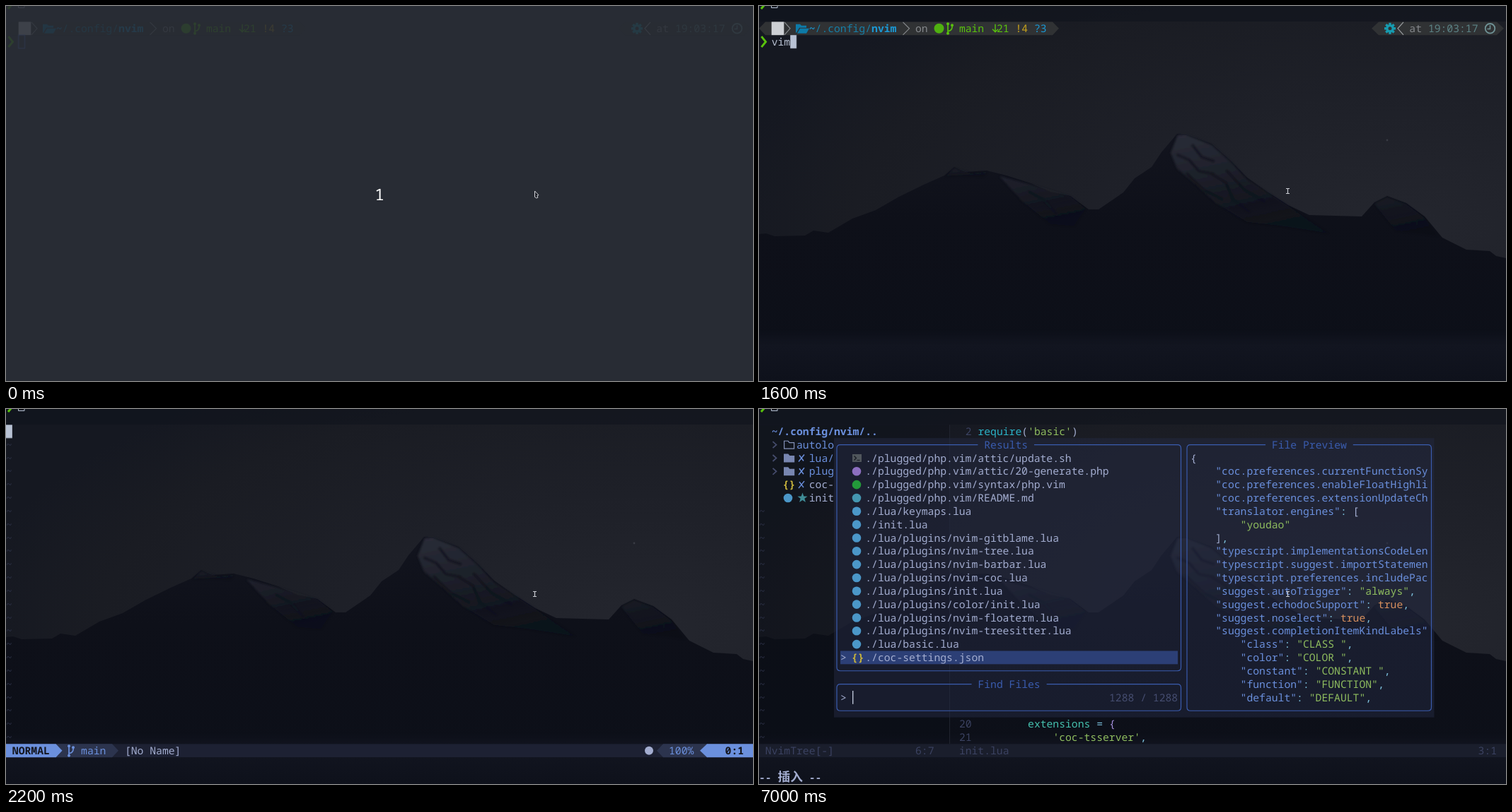
An HTML page for the animation above (8000 ms loop, 1056 px wide and 531 px high).

```html
<!DOCTYPE html>
<html lang="en">
<head>
<meta charset="utf-8">
<title>Editor session</title>
<style>
html, body { margin: 0; width: 100%; height: 100%; overflow: hidden; background: #282c34; }
svg { display: block; width: 1056px; height: 531px; }
text {
  font: 300 14.733px "Noto Sans Mono", "DejaVu Sans Mono", monospace;
  white-space: pre; text-rendering: geometricPrecision; font-variant-ligatures: none;
}
.b { font-weight: 700; }
.cjk { font: 700 17.68px "Noto Sans CJK SC", "Noto Sans CJK", sans-serif; }
.count { font-size: 22.5px; font-weight: 400; text-anchor: middle; }
#stage > g, #typed text, #cursor { animation: 8s step-end infinite; }

#stage > #photo { animation-name: photo; }
#stage > #top { animation-name: top; }
#stage > #count { animation-name: count; }
#stage > #prompt { animation-name: prompt; }
#stage > #typed { animation-name: typed; }
#stage > #empty { animation-name: empty; }
#stage > #code { animation-name: code; }
#stage > #finder { animation-name: finder; }
#stage > #beam { animation-name: beam; }
#stage > #arrow { animation-name: arrow; }
#cursor { animation-name: cursor; }
#typed .v { animation-name: v; }
#typed .i { animation-name: i; }
#typed .m { animation-name: m; }

@keyframes photo { 0% { opacity: 0 } 6.25%, to { opacity: 1 } }
@keyframes top { 0% { opacity: .13 } 6.25%, to { opacity: 1 } }
@keyframes count { 0% { opacity: 1 } 6.25%, to { opacity: 0 } }
@keyframes prompt { 0% { opacity: .13 } 6.25% { opacity: 1 } 26.25%, to { opacity: 0 } }
@keyframes typed { 0% { opacity: 1 } 26.25%, to { opacity: 0 } }
@keyframes empty { 0% { opacity: 0 } 27.5% { opacity: 1 } 61.25%, to { opacity: 0 } }
@keyframes code { 0% { opacity: 0 } 61.25% { opacity: 1 } 87.5%, to { opacity: 0 } }
@keyframes finder { 0% { opacity: 0 } 87.5%, to { opacity: 1 } }
@keyframes beam { 0% { opacity: 0 } 6.25% { opacity: 1 } 28.75% { opacity: 0 } 87.5%, to { opacity: 1 } }
@keyframes arrow {
  0% { opacity: 1; transform: translate(-1px, 0) }
  6.25% { opacity: 0 }
  28.75% { opacity: 1; transform: none }
  87.5%, to { opacity: 0 }
}
@keyframes cursor {
  0% { transform: translate(17.68px, 41.2px); fill: #282c34; stroke: #30394f }
  6.25% { transform: translate(17.68px, 41.2px); fill: #b8c2d4; stroke: none }
  11.25% { transform: translate(26.52px, 41.2px); fill: #b8c2d4; stroke: none }
  17.5% { transform: translate(35.36px, 41.2px); fill: #b8c2d4; stroke: none }
  20% { transform: translate(44.2px, 41.2px); fill: #b8c2d4; stroke: none }
  26.25% { transform: translate(0, 22.4px); fill: #b8c2d4; stroke: none }
  28.75% { transform: translate(35.36px, 22.4px); fill: #b8c2d4; stroke: none }
  61.25%, to { transform: translate(35.36px, 22.4px); fill: transparent; stroke: none }
}
@keyframes v { 0% { fill: transparent } 11.25%, to { fill: #b6bfd0 } }
@keyframes i { 0% { fill: transparent } 11.25% { fill: #191c26 } 17.5%, to { fill: #b6bfd0 } }
@keyframes m { 0% { fill: transparent } 11.25% { fill: #565d6c } 17.5% { fill: #191c26 } 20%, to { fill: #b6bfd0 } }
</style>
</head>
<body>
<svg id="stage" viewBox="0 0 1056 531" xmlns="http://www.w3.org/2000/svg">
  <defs>
    <radialGradient id="sky" gradientUnits="userSpaceOnUse" cx="0" cy="0" r="1" gradientTransform="translate(900 310) scale(960 420)">
      <stop offset="0" stop-color="#24262e"/><stop offset=".45" stop-color="#1e2028"/>
      <stop offset=".8" stop-color="#1a1c23"/><stop offset="1" stop-color="#151821"/>
    </radialGradient>
    <linearGradient id="rock" x2="0" y2="1">
      <stop offset="0" stop-color="#12141e"/><stop offset=".35" stop-color="#0e1019"/><stop offset="1" stop-color="#0c0f18"/>
    </linearGradient>
    <linearGradient id="mist" x2="0" y2="1">
      <stop offset="0" stop-color="#121520" stop-opacity="0"/><stop offset=".3" stop-color="#121520"/><stop offset="1" stop-color="#0e111b"/>
    </linearGradient>
    <linearGradient id="snow" x2=".35" y2="1">
      <stop offset="0" stop-color="#2a2d38"/><stop offset=".5" stop-color="#1b1e28"/><stop offset="1" stop-color="#11131c" stop-opacity=".3"/>
    </linearGradient>
    <filter id="soft"><feGaussianBlur stdDeviation="1.6"/></filter>
  </defs>

  <g id="photo">
    <path fill="url(#sky)" d="M0 0H1056V531H0z"/>
    <path fill="#10131d" opacity=".55" d="M0 0H1056V22H0z"/>
    <path fill="url(#rock)" d="M0 323L10 322 22 326 65 325 77 318 98 321 132 301 165 289 198 270 235 252 262 240 276 228 292 235 322 233 350 240 384 251 412 263 440 269 466 288 480 288 515 264 531 244 555 228 569 207 591 181 603 181 640 195 667 219 690 243 720 264 748 282 778 296 852 298 870 278 888 269 915 279 941 298 966 328 1000 345 1033 347 1042 354 1056 357V531H0z"/>
    <g filter="url(#soft)">
      <path fill="url(#snow)" d="M582 208L592 183 603 182 640 197 667 221 690 246 748 283 805 322 740 312 690 306 645 278 610 246 591 230z"/>
      <path fill="url(#snow)" opacity=".6" d="M340 241L384 253 440 270 462 287 445 312 412 309 372 276z"/>
      <path fill="url(#snow)" opacity=".35" d="M870 280L888 271 915 281 941 300 960 326 900 318z"/>
      <path fill="url(#snow)" opacity=".45" d="M264 241L276 230 300 237 322 235 318 242 285 240z"/>
      <path fill="none" stroke="#11131c" stroke-width="4" opacity=".75" d="M590 210l18 8 14 16 22 4M612 196l14 18 18 6M640 238l20 12 10 24 24 18M660 232l26 28 30 18M604 236l24 24 28 14M380 262l22 12 20 22"/>
    </g>
    <path fill="url(#mist)" d="M0 458H1056V531H0z"/>
    <circle cx="888" cy="190" r="1.4" fill="#383b44"/>
  </g>
  <g id="top" fill="none">
    <path stroke="#59c20d" stroke-width="3" d="M9-3L3 4"/>
    <path stroke="#b8c2d4" d="M17.5-4V2.5H26V-4"/>
  </g>
  <g id="prompt"></g>
  <g id="empty"></g>
  <rect id="cursor" width="8.84" height="18.8"/>
  <g id="typed"></g>
  <g id="code"></g>
  <g id="finder"></g>
  <g id="count"><text class="count" x="528" y="275" fill="#fff">1</text></g>
  <g id="beam"><path fill="none" stroke="#c9ccd2" stroke-width="1.2" d="M745 258.5H750M745 265.5H750M747.5 258.5V265.5"/></g>
  <g id="arrow"><path fill="#1b1d25" stroke="#d4d6da" d="M748.5 262L754 267.8 751.8 268.3 752.8 271.3 751 272 748.5 270.5z"/></g>
</svg>

<script>
const CW = 8.84, LH = 18.83, TOP = 22.4;
const blue = '#6b90dd', light = '#a3add0', green = '#8fbd5f', cyan = '#2bb3c8', dim = '#3b4261',
      dark = '#14161f', yellow = '#c9b53c', lua = '#4b97c8', slate = '#2c344e', panel = '#1d2133', line = '#3a5cae';

const X = col => +(col * CW).toFixed(2);
const Y = row => +(TOP + LH * row).toFixed(2);
const mid = row => Y(row) + LH / 2;

const text = (col, row, s, fill = light, cls = '') =>
  `<text x="${X(col)}" y="${(Y(row) + 14.6).toFixed(2)}" fill="${fill}" class="${cls}">${s}</text>`;
const bold = (col, row, s, fill) => text(col, row, s, fill, 'b');
const rect = (x, y, w, h, fill) => `<rect x="${x}" y="${y}" width="${w}" height="${h}" fill="${fill}"/>`;
const dot = (x, row, fill, r = 6.3) => `<circle cx="${x}" cy="${mid(row)}" r="${r}" fill="${fill}"/>`;
const stroke = (d, color, w = 1.2) => `<path fill="none" stroke="${color}" stroke-width="${w}" d="${d}"/>`;
const at = (x, y, body) => `<g transform="translate(${x} ${y})">${body}</g>`;
const put = (id, ...parts) => document.getElementById(id).innerHTML = parts.flat().join('');

// A status segment; l and r are the lengths of its pointed ends.
const bar = (row, x1, x2, fill, l = 0, r = 0) => {
  const y = Y(row), b = y + LH, m = mid(row);
  return `<polygon fill="${fill}" points="${x1},${y} ${x2},${y} ${x2 + r},${m} ${x2},${b} ${x1},${b} ${x1 - l},${m}"/>`;
};
const chevron = (x, row, w, h, color, weight) =>
  stroke(`M${x} ${mid(row) - h}l${w} ${h} ${-w} ${h}`, color, weight);
const branch = (x, row, color) => at(x, mid(row),
  stroke('M2-7V8M2 4Q8 3 8-2V-4', color, 1.7) +
  `<g fill="${color}"><circle cx="2" cy="-6.5" r="2"/><circle cx="2" cy="7" r="2"/><circle cx="8" cy="-4.5" r="2"/></g>`);
const folder = (x, row, fill, edge = fill) => at(x, mid(row),
  `<path fill="${fill}" stroke="${edge}" stroke-width="1.2" d="M.6-5.4H6L8-3H14.6V5.4H.6z"/>`);

// Colours each match by the first group that took part in it.
const lexer = (re, colors) => s => s.replace(re, (m, ...g) =>
  `<tspan fill="${colors[g.findIndex(x => x !== undefined)]}">${m}</tspan>`);
const luaText = lexer(/('[^']*')|(require)|(setup)|(function)|(\w+)(?= =)|([=,.])|(-)|([{}])/g,
  [green, cyan, blue, '#938fe0', '#45c0ae', '#7cc0dc', dim, '#a48fdc']);
const jsonText = lexer(/("[^".]*"(?!:))|("[^"]*"?)|(true)|([:,])/g, [green, blue, '#d68f5e', '#7cc0dc']);

const tildes = from => Array.from({ length: 24 - from }, (_, i) => text(0, from + i, '~', '#2d3247'));

// Prompt
const gray = '#303234', pGreen = '#59c20d', pBlue = '#1b98d4';
const teeth = Array.from({ length: 8 }, (_, i) =>
  `<rect x="-1.7" y="-8" width="3.4" height="5" transform="rotate(${i * 45})"/>`).join('');
put('prompt',
  bar(0, 9, 415, gray, 9, 9),
  rect(17.7, TOP, 17.6, 18.8, '#cdd0d4'),
  chevron(36, 0, 8, 9, '#85888c'),
  at(52, mid(0), '<path fill="#0d7aa8" d="M0 6V-6H6L8-4H15V-1H5L1 6zM2 7L6 0H19L15 7z"/>'),
  bold(8, 0, '~', pBlue), text(9, 0, '/.config/', '#167fa8'), bold(18, 0, 'nvim', pBlue),
  chevron(203.5, 0, 9, 9, '#85888c'),
  text(25, 0, 'on', '#85888c'),
  dot(254.5, 0, '#4fb010', 7), branch(265, 0, pGreen),
  text(32, 0, 'main', pGreen),
  at(334, mid(0), stroke('M0-6V5M-4 1L0 5 4 1', pGreen, 1.4)),
  text(38, 0, '21', pGreen), text(41, 0, '!4', '#c7a21c'), text(44, 0, '?3', pBlue),
  bar(0, 876, 1043, gray, 10, 10),
  at(892, mid(0), `<g fill="#179bb0">${teeth}</g><circle r="4.2" fill="none" stroke="#179bb0" stroke-width="3.4"/>`),
  chevron(911, 0, -8, 9, '#9a9da0'),
  text(104, 0, 'at', '#85888c'), text(107, 0, '19:03:17', '#5c8386'),
  at(1033.5, mid(0), '<circle r="6.8" fill="none" stroke="#6f9295" stroke-width="1.8"/>' + stroke('M0-4.5V.8H-4', '#6f9295', 1.5)),
  chevron(3.5, 1, 6, 7.5, pGreen, 3));

put('typed', [...'vim'].map((ch, i) => text(2 + i, 1, ch, 'transparent', ch)));

// Status line pieces shared by both editor views
const modeBar = (x, percent, pos) => {
  const col = Math.round(x / CW);
  return [
    rect(x, Y(24), 1056 - x, LH, panel),
    bar(24, x + 70, x + 150, slate, 0, 9), bar(24, x, x + 70.5, blue, 0, 9),
    bold(col + 1, 24, 'NORMAL', dark), branch(x + 87, 24, blue), text(col + 12, 24, 'main', blue),
    bar(24, 929, 992, slate, 9), bar(24, 991, 1056, blue, 10),
    text(110 - percent.length, 24, percent, blue), bold(115, 24, pos, dark)
  ];
};

put('empty',
  text(0, 0, '1', dim), tildes(1), modeBar(0, '100%', '0:1'),
  text(19, 24, '[No Name]'), dot(909, 24, '#a3add0', 6));

// File tree; text past column `end` is covered
const tree = (end = 99) => {
  const name = (row, s, fill) => text(8, row, s.slice(0, end - 8), fill);
  const cross = row => at(60, mid(row), stroke('M-4 5L4-5M-3-4L3 4', blue, 1.5));
  const star = Array.from({ length: 10 }, (_, i) => {
    const r = i % 2 ? 3 : 7.5, a = i * Math.PI / 5;
    return `${(r * Math.sin(a)).toFixed(1)},${(-r * Math.cos(a)).toFixed(1)}`;
  }).join(' ');
  return [
    rect(0, TOP, 269, Y(24) - TOP, 'rgba(10,12,20,.25)'),
    rect(269, TOP, 1, Y(24) - TOP, '#20242f'),
    bold(2, 0, '~/.config/nvim/..', blue),
    [1, 2, 3].map(r => chevron(19.5, r, 5, 4.5, '#454c6c', 1.8)),
    folder(35, 1, 'none', '#8592b8'), folder(35, 2, '#7886b0'), folder(35, 3, '#7886b0'),
    text(6, 1, 'autoload/'.slice(0, end - 6), blue),
    name(2, 'lua/', blue), name(3, 'plugged/', blue), name(4, 'coc-settings.json'), name(5, 'init.lua'),
    [2, 3, 4].map(cross), bold(3.8, 4, '{}', yellow), dot(41, 5, lua),
    at(61.5, mid(5), `<polygon fill="#3f8c96" points="${star}"/>`),
    tildes(6)
  ];
};
const treeStatus = w => [rect(0, Y(24), w, LH, '#1a1e2c'), text(1, 24, 'NvimTree[-]', dim), text(25, 24, '6:7', dim)];

const parsers = 'vim lua javascript typescript tsx vue html css scss json comment http'.split(' ');
const source = [
  "require('basic')", "require('keymaps')", "require('plugins').setup(function()-",
  "    require('nvim-autopairs').setup{}", "    require('plugins.nvim-tree')",
  "    require('plugins.nvim-treesitter').setup({", '        parsers = {',
  ...parsers.map((p, i) => `            '${p}'${i < parsers.length - 1 ? ',' : ''}`),
  '        }', '    })', "    require('plugins.nvim-coc').setup({",
  '        extensions = {', "            'coc-tsserver',"
];
const codeRow = (row, n) =>
  text(34 - String(n).length, row, n, dim) + text(35, row, luaText(source[row]));

put('code',
  tree(), treeStatus(274),
  text(31, 0, '1', dim), text(35, 0, luaText(source[0])),
  source.slice(1).map((_, i) => codeRow(i + 1, i + 1)),
  rect(X(35), TOP, CW, LH, cyan), text(35, 0, 'r', dark),
  modeBar(274, '2%', '1:1'),
  text(50, 24, 'init.lua'), text(86, 24, 'utf-8'),
  chevron(822, 24, -8, 8, light), dot(838.5, 24, '#a3add0', 6), chevron(858, 24, -8, 8, light),
  dot(872.5, 24, lua), text(100.15, 24, 'lua'));

// File finder
const box = (x1, x2, r1, r2, col, title) => {
  const a = X(col - 1), b = X(col + title.length + 1), t = mid(r1), e = mid(r2);
  return stroke(`M${a} ${t}H${x1 + 5}q-5 0-5 5V${e - 5}q0 5 5 5H${x2 - 5}q5 0 5-5V${t + 5}q0-5-5-5H${b}`, line) +
    text(col, r1, title, line);
};
const plug = s => `lua/plugins/${s}.lua`;
const files = [
  'plugged/php.vim/attic/update.sh', 'plugged/php.vim/attic/20-generate.php',
  'plugged/php.vim/syntax/php.vim', 'plugged/php.vim/README.md', 'lua/keymaps.lua', 'init.lua',
  ...['nvim-gitblame', 'nvim-tree', 'nvim-barbar', 'nvim-coc', 'init', 'color/init', 'nvim-floaterm', 'nvim-treesitter'].map(plug),
  'lua/basic.lua', 'coc-settings.json'
];
const iconColor = { php: '#8d6fc0', vim: '#239a3a', md: '#4496b0', lua };
const icon = (file, row) => {
  const ext = file.split('.').pop();
  if (ext === 'json') return bold(14.8, row, '{}', yellow);
  if (ext === 'sh') return at(138.5, mid(row), rect(-6.5, -5.5, 13, 11, '#50565c') + stroke('M-4-3L-1 0-4 3M0 3H4', '#151820'));
  return dot(138, row, iconColor[ext]);
};
const preview = [
  '{', '    "coc.preferences.currentFunctionSy', '    "coc.preferences.enableFloatHighli',
  '    "coc.preferences.extensionUpdateCh', '    "translator.engines": [', '        "youdao"', '    ],',
  '    "typescript.implementationsCodeLen', '    "typescript.suggest.importStatemen',
  '    "typescript.preferences.includePac', '    "suggest.autoTrigger": "always",',
  '    "suggest.echodocSupport": true,', '    "suggest.noselect": true,',
  '    "suggest.completionItemKindLabels"', '        "class": "CLASS ",', '        "color": "COLOR ",',
  '        "constant": "CONSTANT ",', '        "function": "FUNCTION",', '        "default": "DEFAULT",'
];

put('finder',
  tree(12), treeStatus(1056),
  codeRow(0, 2), codeRow(22, 20), codeRow(23, 21),
  text(32, 24, 'init.lua', dim), text(115, 24, '3:1', dim),
  rect(106, Y(1), 848.5, LH * 21, 'rgba(35,41,64,.55)'),
  box(110, 596.5, 1, 18, 36, 'Results'),
  box(110, 596.5, 19, 21, 35, 'Find Files'),
  box(605, 950.5, 1, 21, 82, 'File Preview'),
  rect(115, Y(17), 477, LH, '#2c3f76'),
  files.map((f, i) => icon(f, i + 2) + text(17, i + 2, './' + f)),
  text(13, 17, '>'), text(13, 20, '>'),
  rect(132, Y(20), 1.4, LH, '#b8c2d4'),
  text(56, 20, '1288 / 1288', '#454d70'),
  preview.map((s, i) => text(69, i + 2, jsonText(s))),
  bold(0, 26, '--', light), text(3, 26, '插入', light, 'cjk'), bold(8, 26, '--', light));
</script>
</body>
</html>
```
